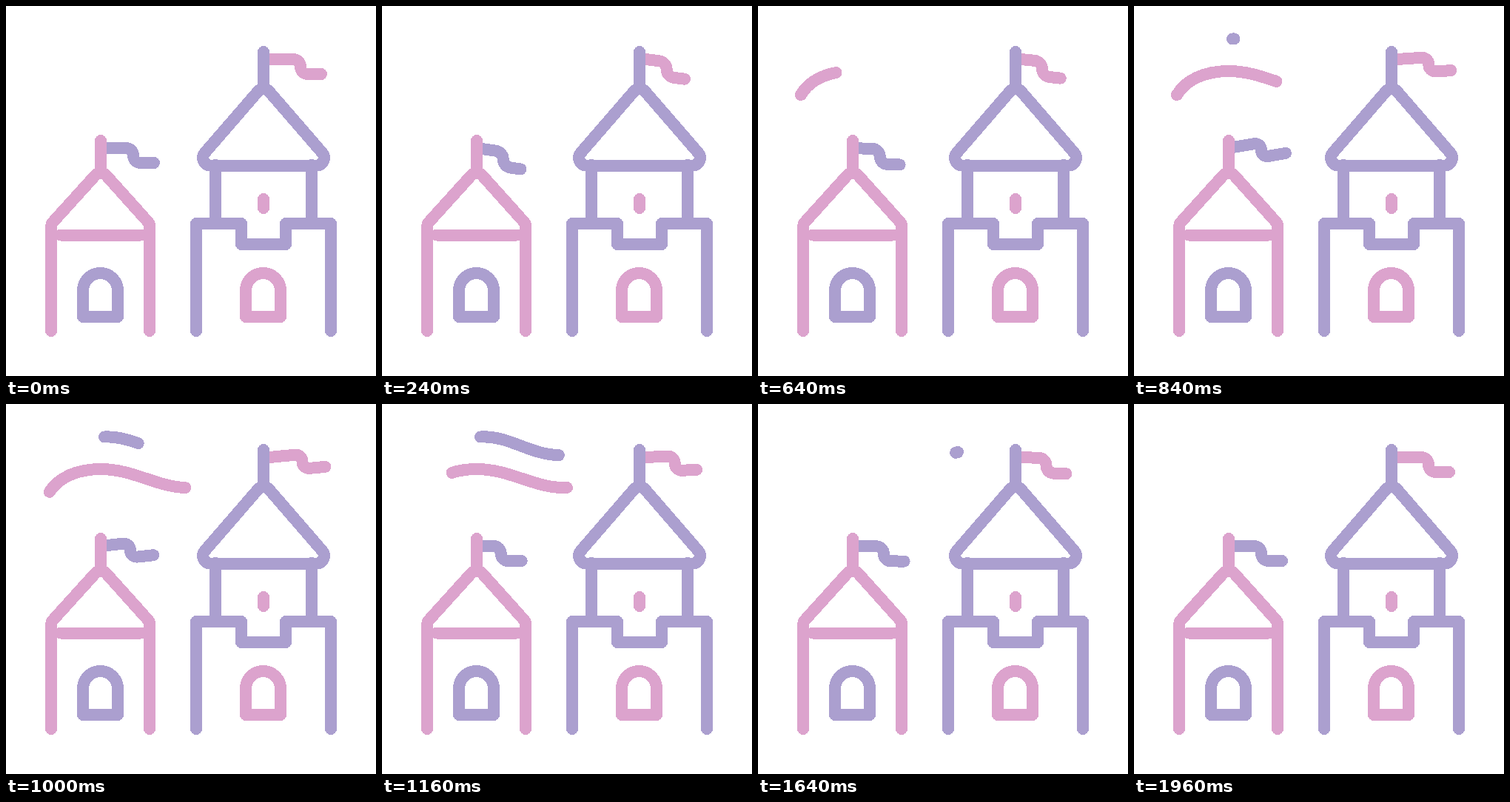
An HTML page for the animation above (2 s loop, 500x500 px).

```html
<!DOCTYPE html>
<html>
<head>
<meta charset="utf-8">
<style>
html, body { margin: 0; width: 100%; height: 100%; overflow: hidden; background: #fff; }
svg { display: block; width: 100vw; height: 100vh; fill: none; stroke-width: 16; stroke-linecap: round; stroke-linejoin: round; shape-rendering: crispEdges; }
.pink { stroke: #dca3cd; }
.purple { stroke: #ab9fcf; }
</style>
</head>
<body>
<svg viewBox="0 0 500 500">
  <path id="windLow" class="pink" pathLength="1" d="M58 120C70 100 95 88 128 88C174 88 208 115 250 113"/>
  <path id="windHigh" class="purple" pathLength="1" d="M133 44.500C180 41.500 211 82 270 65"/>
  <path id="flagLeft" class="purple"/>
  <path id="flagRight" class="pink"/>
  <g class="pink">
    <path d="M128 182V226M61 439V299Q61 295 63 292.500L120.500 229Q128 221 135.500 229L192.500 292.500Q194.500 295 194 299V439M74 309.500H182"/>
    <path d="M324 420V384.500a23.500 23.500 0 0 1 47 0V420ZM348 261V273"/>
  </g>
  <g class="purple">
    <path d="M104 420V384.500a23.500 23.500 0 0 1 47 0V420Z"/>
    <path d="M348 62V112M276 215.500C268 215.500 262.500 205.500 269 198L340 116Q348 106.500 356 116L427 198C433.500 205.500 428 215.500 420 215.500Z"/>
    <path d="M283 215V294M413 215V294M257 439V294H318V322H378V294H439V439"/>
  </g>
</svg>
<script>
const LOOP = 2000;
const el = id => document.getElementById(id);
const mix = (a, b, u) => a + (b - a) * u;

// Eased 0 to 1 between two times
function ramp(t, from, to) {
  const u = Math.min(1, Math.max(0, (t - from) / (to - from)));
  return u * u * (3 - 2 * u);
}

// Each flag droops, lifts, sags and returns to rest
const flags = [
  { id: 'flagLeft', x: 128, y: 192, length: 72, swing: [
    { at: 440, reach: -22, tilt: .25 },
    { at: 840, reach: 5, tilt: -.17 },
    { at: 1320, reach: -17, tilt: .06 },
    { at: 1740, reach: 0, tilt: 0 }] },
  { id: 'flagRight', x: 356, y: 72, length: 70, swing: [
    { at: 440, reach: -30, tilt: .22 },
    { at: 940, reach: 6, tilt: -.1 },
    { at: 1480, reach: -13, tilt: .05 },
    { at: 1960, reach: 0, tilt: 0 }] }
];

function drawFlag({ id, x, y, length, swing }, t) {
  let reach = 0, tilt = 0, last = 0;
  for (const key of swing) {
    const u = ramp(t, last, key.at);
    reach = mix(reach, key.reach, u);
    tilt = mix(tilt, key.tilt, u);
    last = key.at;
  }
  const tip = x + length + reach;
  const fold = tip - 28 + 30 * tilt;
  const top = px => y + tilt * (px - x);
  const bottom = px => top(px) + 20;
  const a = fold - 10, b = fold + 10, r = 5.5;
  const middle = (top(a) + bottom(b)) / 2;
  el(id).setAttribute('d',
    `M${x} ${y}L${a} ${top(a)}C${a + r} ${top(a + r)} ${fold} ${middle - r} ${fold} ${middle}` +
    `S${b - r} ${bottom(b - r)} ${b} ${bottom(b)}L${tip} ${bottom(tip)}`);
}

function drawWind(id, start, end) {
  const s = el(id).style;
  s.display = end > start ? '' : 'none';
  s.strokeDasharray = `${end - start} 3`;
  s.strokeDashoffset = -start;
}

function frame(now) {
  const t = now % LOOP;
  flags.forEach(flag => drawFlag(flag, t));
  drawWind('windLow', ramp(t, 970, 1590), ramp(t, 405, 1080));
  drawWind('windHigh', ramp(t, 1215, 1680), ramp(t, 800, 1320));
  requestAnimationFrame(frame);
}
frame(0);
</script>
</body>
</html>
```
